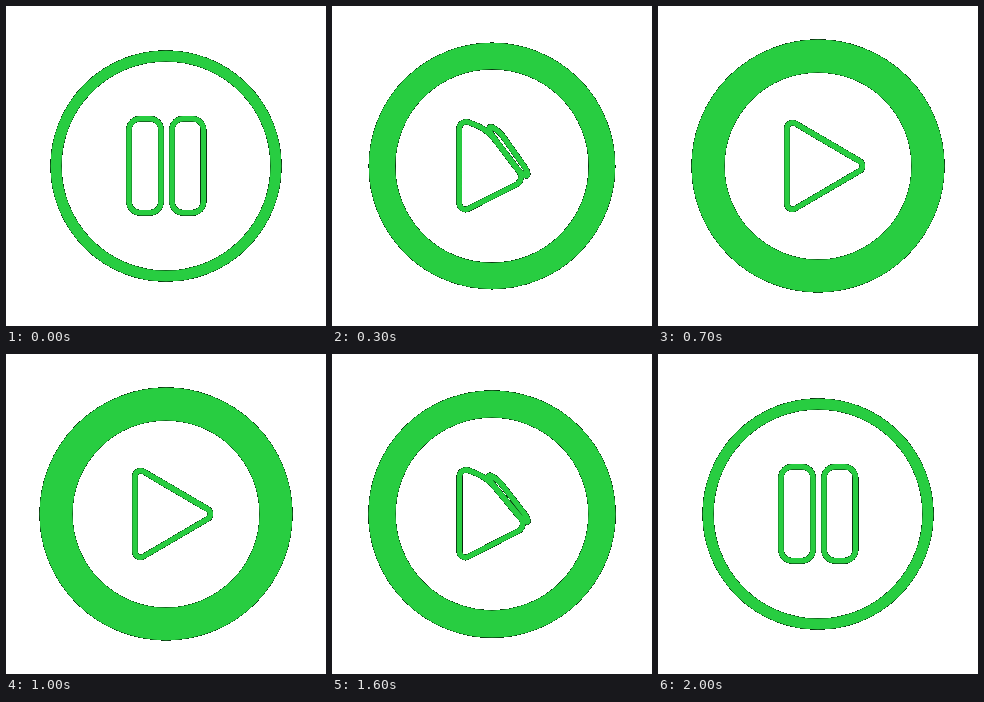
These frames come from a looping animation (320x320 px, 2.5 s). An HTML page with a canvas:

```html
<!DOCTYPE html>
<html lang="en">
<head>
<meta charset="utf-8">
<title>Pause and play</title>
<style>
  html, body { margin: 0; width: 100%; height: 100%; overflow: hidden; background: #fff; }
  canvas { display: block; width: 320px; height: 320px; }
</style>
</head>
<body>
<canvas id="stage" width="320" height="320"></canvas>
<script>
const SIZE = 320, LOOP = 2500, STEP = 100, MORPH = 700;
const BACK = 1365, REST = 2000;
const GREEN = '#28cd41';
const EDGE = 40; // least coverage that shows as a dark rim

const ctx = document.getElementById('stage').getContext('2d', { willReadFrequently: true });

// Corners run clockwise from the top left.
const left = {
  pause: [[123, 112.7], [155, 112.7], [155, 206.7], [123, 206.7]],
  play: [[129, 112.6], [155, 127.8], [210, 160], [129, 207.4]]
};
const right = {
  pause: [[166, 112.7], [197.5, 112.7], [197.5, 206.7], [166, 206.7]],
  play: [[148, 123.7], [151, 125.5], [199, 153.5], [201, 154.7]]
};

const mix = (a, b, k) => a + (b - a) * k;
const mixPoint = (a, b, k) => [mix(a[0], b[0], k), mix(a[1], b[1], k)];

// cubic-bezier(.67, 0, 0, 1)
function ease(x) {
  if (x <= 0) return 0;
  if (x >= 1) return 1;
  let lo = 0, hi = 1;
  for (let i = 0; i < 30; i++) {
    const u = (lo + hi) / 2;
    if (2.01 * u * (1 - u) ** 2 + u ** 3 < x) lo = u; else hi = u;
  }
  return lo * lo * (3 - 2 * lo);
}

function progress(t) {
  if (t >= REST) return 0;
  return t < BACK ? ease(t / MORPH) : 1 - ease((t - BACK) / MORPH);
}

function toward(a, b, dist) {
  const len = Math.hypot(b[0] - a[0], b[1] - a[1]) || 1;
  return mixPoint(a, b, Math.min(dist / len, 0.5));
}

function drawShape(shape, p) {
  const pts = shape.pause.map((pt, i) => mixPoint(pt, shape.play[i], p));
  const cut = mix(11, 9.7, p), bend = mix(0.55, 0.444, p);
  ctx.beginPath();
  pts.forEach((pt, i) => {
    const a = toward(pt, pts[(i + 3) % 4], cut);
    const b = toward(pt, pts[(i + 1) % 4], cut);
    ctx.lineTo(...a);
    ctx.bezierCurveTo(...mixPoint(a, pt, bend), ...mixPoint(b, pt, bend), ...b);
  });
  ctx.closePath();
  ctx.stroke();
}

// Hard edges: partly covered pixels turn dark instead of transparent.
function hardenEdges() {
  const img = ctx.getImageData(0, 0, SIZE, SIZE), d = img.data;
  for (let i = 0; i < d.length; i += 4) {
    const cover = d[i + 3];
    if (cover === 255) continue;
    for (let c = 0; c < 3; c++) d[i + c] *= cover / 255;
    d[i + 3] = cover > EDGE ? 255 : 0;
  }
  ctx.putImageData(img, 0, 0);
}

function draw(t) {
  const p = progress(t);
  ctx.clearRect(0, 0, SIZE, SIZE);
  ctx.strokeStyle = GREEN;
  ctx.lineJoin = 'round';
  ctx.lineWidth = mix(11, 33, p);
  ctx.beginPath();
  ctx.arc(160, 160, 110, 0, 2 * Math.PI);
  ctx.stroke();
  ctx.lineWidth = 5.5;
  drawShape(left, p);
  drawShape(right, p);
  hardenEdges();
}

const start = performance.now();
let shown = -1;
function tick() {
  const t = Math.floor(((performance.now() - start) % LOOP) / STEP) * STEP;
  if (t !== shown) draw(shown = t);
  requestAnimationFrame(tick);
}
tick();
</script>
</body>
</html>
```
